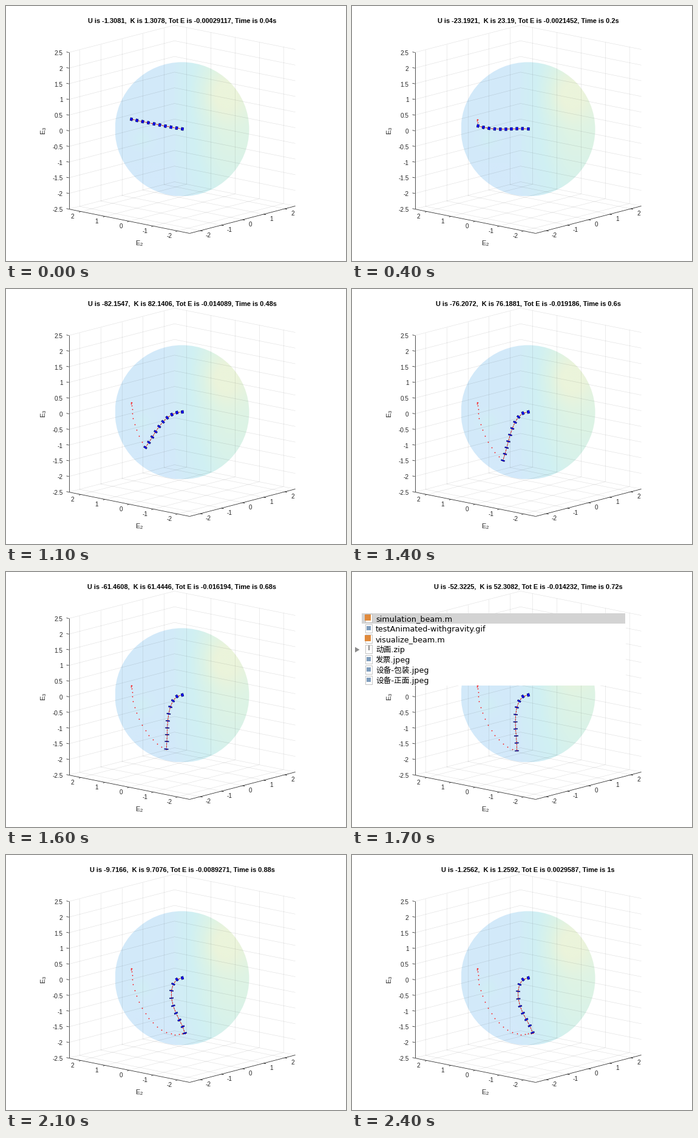
Write a matplotlib script that moves like this. It is 560 by 420 pixels and loops after 2.5 s.

```python
import math

import matplotlib.pyplot as plt
import numpy as np
from matplotlib.animation import FuncAnimation
from matplotlib.patches import Circle, Polygon, Rectangle

W, H, DPI = 560, 420, 72
FRAMES, STEP_MS = 25, 100
LISTING_FRAME = 17
INK = "#262626"
plt.rcParams["font.family"] = "Liberation Sans"

fig = plt.figure(figsize=(W / DPI, H / DPI), dpi=DPI, facecolor="white")
ax = fig.add_axes([0, 0, 1, 1])
ax.set_axis_off()

# Orthographic view: screen vectors of one unit along each axis
CENTER = np.array([289.5, 202.5])
E1 = np.array([34.8, -9.0])
E2 = np.array([-39.8, -8.0])
E3 = np.array([0.0, -51.6])
LIM = 2.5
TICKS = range(-2, 3)


def project(a, b, c):
    return CENTER + a * E1 + b * E2 + c * E3


def line(p, q, **kw):
    ax.plot([p[0], q[0]], [p[1], q[1]], solid_capstyle="butt", **kw)


def label(p, s, **kw):
    opts = dict(size=10, color=INK, ha="center", va="center")
    ax.text(p[0], p[1], s, **{**opts, **kw})


def draw_sphere(r=110.5):
    x, y = np.meshgrid(np.linspace(-1, 1, 160), np.linspace(1, -1, 160))

    def glow(cx, cy, w):
        return np.exp(-((x - cx) ** 2 + (y - cy) ** 2) / w ** 2)

    s = np.clip((x + 0.35) / 1.05, 0, 1)
    v = 0.05 + 0.62 * s * s * (3 - 2 * s) + 0.33 * glow(0.62, 0.5, 0.4)
    v += 0.25 * glow(-0.6, -0.15, 0.13) + 0.08 * (x > -0.1)
    v -= 0.25 * np.clip(-y - 0.3, 0, 1)
    stops = [0, 0.45, 0.75, 1]
    channels = [(211, 208, 220, 235), (233, 240, 243, 244), (250, 243, 230, 219)]
    rgb = np.dstack([np.interp(v, stops, c) / 255 for c in channels])
    cx, cy = CENTER
    img = ax.imshow(rgb, extent=(cx - r, cx + r, cy + r, cy - r),
                    interpolation="bilinear", aspect="auto", zorder=1)
    img.set_clip_path(Circle(CENTER, r, transform=ax.transData))


def draw_axes():
    grid = dict(color=INK, alpha=0.14, lw=0.6, zorder=2)
    for t in TICKS:
        line(project(t, -LIM, -LIM), project(t, LIM, -LIM), **grid)
        line(project(t, LIM, -LIM), project(t, LIM, LIM), **grid)
        line(project(-LIM, t, -LIM), project(LIM, t, -LIM), **grid)
        line(project(LIM, t, -LIM), project(LIM, t, LIM), **grid)
    for z in np.arange(-LIM, LIM + 0.1, 0.5):
        line(project(-LIM, LIM, z), project(LIM, LIM, z), **grid)
        line(project(LIM, LIM, z), project(LIM, -LIM, z), **grid)

    edge = dict(color=INK, lw=0.8, zorder=3)
    left, front = project(-LIM, LIM, -LIM), project(-LIM, -LIM, -LIM)
    line(left, project(-LIM, LIM, LIM), **edge)
    line(left, front, **edge)
    line(front, project(LIM, -LIM, -LIM), **edge)
    for z in np.arange(-LIM, LIM + 0.1, 0.5):
        p = project(-LIM, LIM, z)
        line(p, p + 0.1 * E2, **edge)
        label((93, p[1] + 0.5), f"{z:g}", ha="right", va="center_baseline")
    for t in TICKS:
        p, q = project(-LIM, t, -LIM), project(t, -LIM, -LIM)
        line(p, p - 0.1 * E1, **edge)
        line(q, q - 0.1 * E2, **edge)
        label(p + (-14, 8.5), f"{t}")
        label(q + (13, 8.5), f"{t}")
    label((219, 391), r"E$_{\mathregular{2}}$", size=11)
    label((62, 205), r"E$_{\mathregular{3}}$", size=11, rotation=90)


def hermite(times, values):
    """Smooth curve through keys, sampled at every frame."""
    t, v = np.array(times, float), np.array(values, float)
    m = np.gradient(v, t, axis=0, edge_order=2)
    out = []
    for n in range(FRAMES):
        i = min(np.searchsorted(t, n, side="right") - 1, len(t) - 2)
        h = t[i + 1] - t[i]
        u = (n - t[i]) / h
        out.append((2 * u**3 - 3 * u**2 + 1) * v[i] + (u**3 - 2 * u**2 + u) * h * m[i]
                   + (3 * u**2 - 2 * u**3) * v[i + 1] + (u**3 - u**2) * h * m[i + 1])
    return np.array(out)


# Beam poses: positions of nodes 1, 3, 6 and 9; node 0 is fixed
BASE = (290, 202)
HELD = [0, 1, 3, 6, 9]
POSES = {
    0: [(280.5, 200.6), (262, 197.3), (234, 191.8), (206, 186)],
    4: [(280.3, 201.5), (262, 202), (234.5, 202), (207, 197)],
    7: [(280.3, 202.3), (263, 205.5), (238, 213.5), (211, 222)],
    11: [(281, 203), (265, 211.5), (246, 234.5), (229, 260.5)],
    14: [(281, 204), (268, 219), (257, 250.5), (248, 282)],
    17: [(281, 204.5), (271, 222.5), (269, 258), (271, 294)],
    21: [(281, 204.5), (272, 223), (279.5, 260), (294, 293)],
    24: [(281, 204.5), (273, 224), (281, 260), (297, 292)],
}
poses = hermite(list(POSES), [[BASE] + p for p in POSES.values()])
nodes_at = [np.column_stack([np.polyval(np.polyfit(HELD, p[:, k], 4), np.arange(10))
                             for k in (0, 1)]) for p in poses]
tips = np.array([p[-1] for p in nodes_at])

ENERGY_KEYS = [0, 4, 11, 14, 17, 21, 24]
kinetic = hermite(ENERGY_KEYS, [1.3078, 23.19, 82.1406, 76.18806, 52.30824, 9.70764, 1.2592])
total = hermite(ENERGY_KEYS, [-0.00029117, -0.0021452, -0.014089, -0.019186,
                              -0.014232, -0.0089271, 0.0029587])


def num(v):
    digits = max(math.floor(math.log10(abs(v))) + 5, 5)
    return f"{v:.{digits}g}"


def section(p, tangent):
    """Beam cross-section: thins out as the beam turns downwards."""
    d = tangent / np.hypot(*tangent)
    a = d * (0.5 + 1.4 * abs(d[0]))
    b = np.array([-d[1], d[0]]) * (3.2 - 0.8 * abs(d[0]))
    return [p + a + b, p + a - b, p - a - b, p - a + b]


def draw_listing():
    """File list window that covers the plot for a moment."""
    parts = []

    def add(patch, z=20):
        patch.set_zorder(z)
        parts.append(ax.add_patch(patch))

    add(Rectangle((-0.5, 67.5), 451, 119, fc="white", ec="none"))
    add(Rectangle((15.5, 67.5), 434, 17, fc="#d3d3d3", ec="none"), 21)
    add(Polygon([(4.5, 123), (4.5, 132), (12, 127.5)], fc="#8a8a8a", ec="none"), 21)
    files = [("simulation_beam.m", "#e08a3c"), ("testAnimated-withgravity.gif", "#7f9dbd"),
             ("visualize_beam.m", "#e08a3c"), ("动画.zip", "#8c8c8c"),
             ("发票.jpeg", "#7f9dbd"), ("设备-包装.jpeg", "#7f9dbd"),
             ("设备-正面.jpeg", "#7f9dbd")]
    for i, (name, color) in enumerate(files):
        y = 76 + 17 * i
        add(Rectangle((21.5, y - 7), 11, 14, fc="white", ec="#b4b4b4", lw=0.8), 22)
        if name.endswith(".m"):
            add(Rectangle((20, y - 6), 10, 10, fc=color, ec="none"), 23)
        elif name.endswith(".zip"):
            add(Rectangle((26, y - 6), 2, 8, fc=color, ec="none"), 23)
        else:
            add(Rectangle((23.5, y - 4), 7, 7, fc=color, ec="none"), 23)
        parts.append(ax.text(38.5, y + 4.5, name, size=12.7, color="black", zorder=23,
                             family=["DejaVu Sans", "Noto Sans CJK JP"]))
    return parts


draw_sphere()
draw_axes()
title = ax.text(289.5, 27, "", size=11, weight="bold", color="black", ha="center")
trail, = ax.plot([], [], "o", color="red", ms=1.7, mew=0, zorder=5)
core, = ax.plot([], [], color="black", lw=0.5, alpha=0.6, zorder=6)
beam, = ax.plot([], [], color="red", lw=0.9, ls=(0, (3, 2)), zorder=7)
sections = [ax.add_patch(Polygon(np.zeros((4, 2)), fc="#0000ff", ec="#000030",
                                 lw=0.5, zorder=8)) for _ in range(10)]
listing = draw_listing()
ax.set_xlim(-0.5, W - 0.5)
ax.set_ylim(H - 0.5, -0.5)


def update(n):
    pts = nodes_at[n]
    trail.set_data(tips[:n + 1, 0], tips[:n + 1, 1])
    for artist in (core, beam):
        artist.set_data(pts[:, 0], pts[:, 1])
    for patch, p, d in zip(sections, pts, np.gradient(pts, axis=0)):
        patch.set_xy(section(p, d))
    k, e = kinetic[n], total[n]
    title.set_text(f"U is {num(e - k)},  K is {num(k)}, Tot E is {num(e)}, "
                   f"Time is {0.04 * (n + 1):g}s")
    for artist in listing:
        artist.set_visible(n == LISTING_FRAME)
    return []


anim = FuncAnimation(fig, update, frames=FRAMES, interval=STEP_MS,
                     init_func=lambda: update(0), repeat=True, repeat_delay=0)
plt.show()
```
